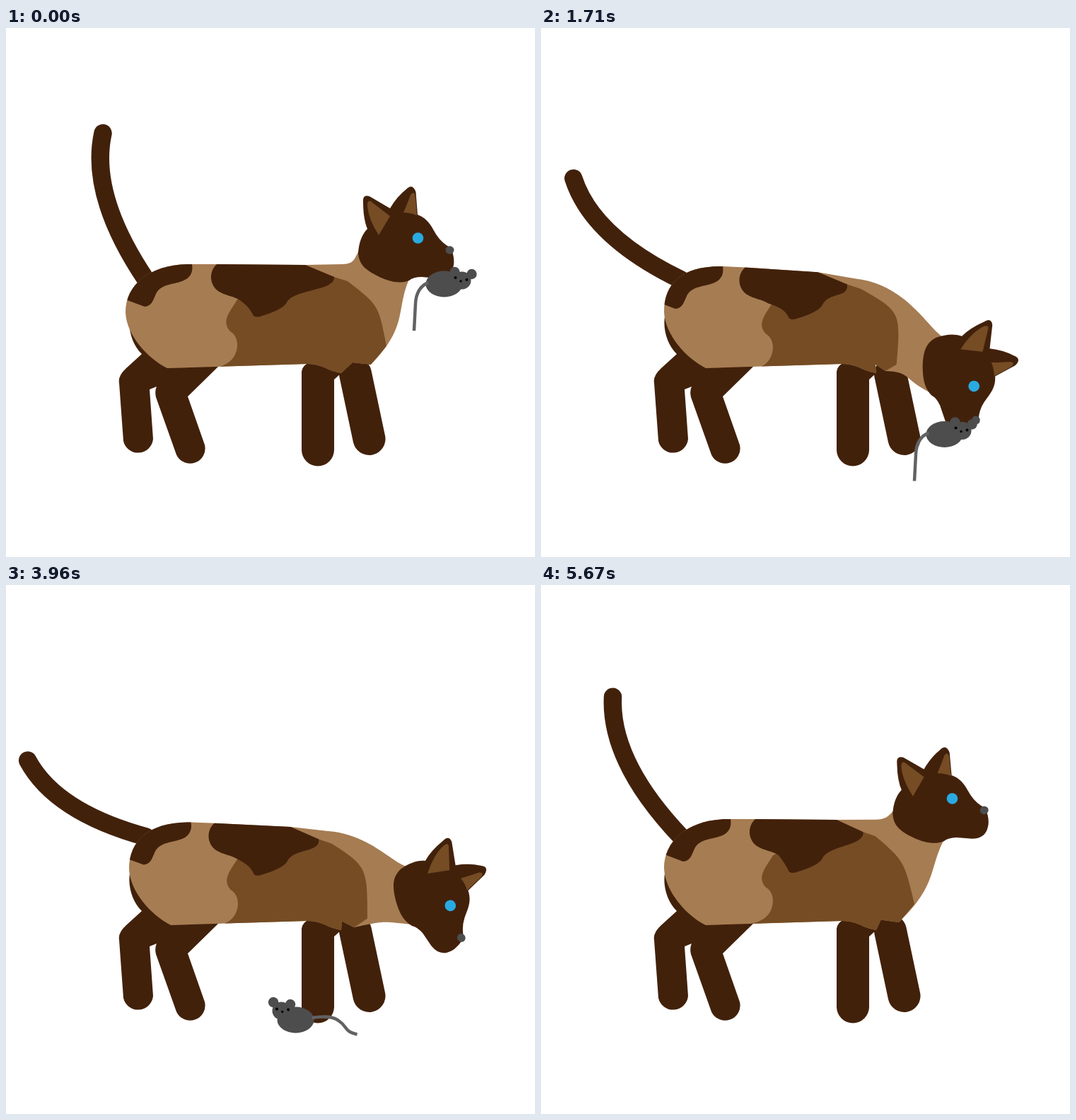
Recreate the animation shown at these times as an HTML page. Size 748x748 px, loop 5.7 s.

```html
<!DOCTYPE html>
<html lang="en">
<head>
<meta charset="utf-8">
<title>Cat and mouse</title>
<style>
html, body { margin: 0; width: 100%; height: 100%; overflow: hidden; background: #fff; }
svg { display: block; width: 100%; height: 100%; }
</style>
</head>
<body>
<svg viewBox="0 0 748 748">
  <defs><clipPath id="bodyClip"><path id="clipShape"/></clipPath></defs>
  <path id="tail" fill="none" stroke="#42210b" stroke-width="25.5" stroke-linecap="round"/>
  <g fill="#42210b">
    <path d="M190,380C166,400 172,442 192,461L170,481Q158,492 160,502L166,584A21.3,21.3 0 0 0 208,581L203,511L213,507Q210,513 212,522L241,603.500A21.3,21.3 0 0 0 281,589.500L257,521L305,474L300,400Z"/>
    <path d="M418,596.500V486Q420,474 434,472H464L474,488L464,497V596.500A23,23 0 0 1 418,596.500"/>
    <path stroke="#42210b" stroke-width="46" stroke-linecap="round" d="M494,489L513.500,581"/>
  </g>
  <path id="body" fill="#a67c52"/>
  <g clip-path="url(#bodyClip)">
    <path id="flank" fill="#754c24"/>
    <path id="saddle" fill="#42210b"/>
    <path id="rump" fill="#42210b"/>
  </g>
  <g id="head">
    <path fill="#42210b" d="M505,246Q504,235 514,238L543,255Q553,238 566,228Q575,219 579.500,232L582,264C598,270 602,282 609,293Q616,304 629,311C635,325 634,335 631,342Q626,354 610,354L588,352Q576,352 570,357C555,363 540,357 530,353C508,343 499,334 498,318C499,304 503,292 511,284Q505,270 505,246Z"/>
    <path fill="#754c24" d="M511,249Q512,242 517,246L543,266L527,293Q511,268 511,249Z"/>
    <path fill="#754c24" d="M572,236Q577,229 579,239L581,265Q572,261 562,261Q568,247 572,236Z"/>
    <circle cx="582.500" cy="297" r="7.800" fill="#29abe2"/>
    <ellipse cx="627.500" cy="314" rx="6" ry="5.800" fill="#4d4d4d"/>
  </g>
  <g id="mouse">
    <ellipse rx="26" ry="18.500" fill="#4d4d4d"/>
    <g id="mouseHead">
      <g fill="#4d4d4d">
        <circle cx="25.500" cy="-5" r="12.500"/>
        <circle cx="15" cy="-17" r="7.200"/>
        <circle cx="39" cy="-14" r="7.200"/>
      </g>
      <circle cx="16" cy="-9" r="2"/>
      <circle cx="32" cy="-6" r="2"/>
      <circle cx="23.500" cy="-4" r="1.700"/>
    </g>
    <path id="mouseTail" fill="none" stroke="#626262" stroke-width="4.500"/>
  </g>
</svg>
<script>
const LOOP = 5700, STEP = 30, RUN = 3600, GONE = 4860;
const EYE = [582, 297];
const set = (id, name, value) => document.getElementById(id).setAttribute(name, value);
const smooth = s => s * s * (3 - 2 * s);
const mix = (a, b, k) => a.map((v, i) => v + (b[i] - v) * k);
const off = (p, dx, dy) => [p[0] + dx, p[1] + dy];
const polar = (r, degrees) => [r * Math.cos(degrees * Math.PI / 180), r * Math.sin(degrees * Math.PI / 180)];

// Smooth monotone interpolation through [time, vector] keys, at rest at both ends.
function track(keys) {
  const rate = (i, k) => (keys[i + 1][1][k] - keys[i][1][k]) / (keys[i + 1][0] - keys[i][0]);
  const slope = (i, k) => {
    if (i === 0 || i === keys.length - 1) return 0;
    const a = rate(i - 1, k), b = rate(i, k);
    return a * b <= 0 ? 0 : 2 * a * b / (a + b);
  };
  return t => {
    if (t >= keys[keys.length - 1][0]) return keys[keys.length - 1][1];
    const i = keys.findIndex((key, n) => t < keys[n + 1][0]);
    const [t0, from] = keys[i], [t1, to] = keys[i + 1];
    const h = t1 - t0, s = (t - t0) / h;
    return from.map((v, k) => v + (to[k] - v) * smooth(s)
      + h * slope(i, k) * s * (1 - s) ** 2 + h * slope(i + 1, k) * s * s * (s - 1));
  };
}

// Head poses: eye x, eye y, tilt in degrees.
const proud = [...EYE, 0], level = [628, 397, 30.7], lowered = [628, 453, 50.5], bowed = [612, 506, 66];
const headAt = track([
  [0, proud], [600, mix(proud, level, 0.5)], [840, level], [1200, lowered], [1710, bowed],
  [3390, bowed], [3960, lowered], [4250, level], [4680, [595, 315, 4]], [4820, [581, 302, -0.7]]
]);

// Tail: angle from upright and length.
const up = [16.4, 216];
const tailAt = track([
  [0, up], [850, up], [1710, [46.7, 209]], [1815, [53, 205]], [3100, [43, 207]], [3390, [44.6, 205]],
  [4200, [60, 198]], [4680, [38.2, 239]], [5050, up], [5350, up], [5670, [26, 220]]
]);

const carriedAt = track([
  [0, [619.5, 362]], [600, [628, 416]], [840, [619.5, 474.5]], [1200, [607, 536]],
  [1710, [570.5, 574.5]], [3000, [559, 605]], [3390, [558, 615]]
]);

function drawCat([x, y, tilt], settle) {
  const bend = tilt / 66;
  // The trunk shortens as it settles, and its back slides rearward as the head bows.
  const lean = (px, py) => [
    px + settle * (5 - 0.082 * Math.max(0, px - 300))
      - bend * bend * (11 + 0.1 * (px - 263)) * Math.max(0, 400 - py) / 66,
    py + (481 - py) / 147 * (bend * (6 + 0.045 * (px - 263)) - 3 * settle)
  ];
  const withHead = (px, py) => {
    const [c, s] = polar(1, tilt), dx = px - EYE[0], dy = py - EYE[1];
    return [x + dx * c - dy * s, y + dx * s + dy * c];
  };
  const pull = (px, py, weight) => mix(lean(px, py), withHead(px, py), weight);

  const rumpTop = lean(263, 334), rear = lean(169, 402), belly = lean(228, 481);
  const saddleL = lean(298, 334), saddleR = lean(423, 335);
  const saddleTip = lean(464, 352), saddleLow = lean(350, 407);
  const nape = pull(475, 334, 0.1), napeEnd = withHead(505, 305);
  const reach = Math.hypot(napeEnd[0] - nape[0], napeEnd[1] - nape[1]) / 2;
  const chest = pull(516, 476, 0.2), bendPoint = lean(527, 392);

  const outline = `M${belly}C${off(belly, -28, -14)} ${off(rear, 1, 32)} ${rear}`
    + `C${off(rear, 0, -40)} ${off(rumpTop, -58, -1)} ${rumpTop}L${saddleL}L${saddleR}L${nape}`
    + `C${off(nape, reach, reach * 0.1 * bend)} ${withHead(492, 323)} ${napeEnd}L${withHead(571, 353)}`
    + `C${pull(550, 400, 0.8)} ${pull(570, 420, 0.5)} ${chest}L${pull(490, 473, 0.1)}`
    + 'L474,488Q462,486 450,480Q438,475 425,475Z';
  set('body', 'd', outline);
  set('clipShape', 'd', outline);
  set('rump', 'd', `M${rumpTop}c2,12 -3,20 -14,24c-14,5 -28,4 -36,16c-5,10 -6,19 -17,20l-32,-12v-70h99z`);
  set('saddle', 'd', `M${saddleL}c-11,10 -11,28 2,38c11,7 22,7 31,13`
    + `C${off(saddleLow, -8, -14)} ${off(saddleLow, -4, -8)} ${saddleLow}q4,3 12,0`
    + `Q${off(saddleLow, 42, -9)} ${off(saddleLow, 47, -19)}`
    + `C${off(saddleLow, 57, -38)} ${off(saddleTip, 2, 20)} ${saddleTip}L${saddleR}V320H${saddleL[0]}Z`);
  set('flank', 'd', `M${off(saddleLow, -23, -23)}c-9,16 -24,30 -10,45c16,9 12,38 -6,46q-6,4 -14,5v20`
    + `H474L${chest}L${pull(538, 450, 0.3)}C${bendPoint} ${bendPoint} ${lean(483, 358)}L${saddleTip}L${saddleR}Z`);
  set('head', 'transform', `translate(${x},${y}) rotate(${tilt}) translate(${-EYE[0]},${-EYE[1]})`);
}

function drawTail([angle, length]) {
  const at = (part, turn) => off(polar(length * part, 270 - angle - turn), 198, 356);
  set('tail', 'd', `M${at(1, 0)}C${at(0.73, 12.5)} ${at(0.36, 17.5)} 198,356`);
}

function drawMouse(t) {
  const running = t >= RUN;
  const [x, y] = running ? [558 - 0.4125 * (t - RUN), 615] : carriedAt(t);
  set('mouse', 'visibility', t < GONE ? 'visible' : 'hidden');
  set('mouse', 'transform', `translate(${x},${y})`);
  set('mouseHead', 'transform', running ? 'translate(3,-2) rotate(14) scale(-1,1)' : '');
  set('mouseTail', 'd', running
    ? 'M23,-3C42,-6 54,-5 62,2C74,10 68,16 87,20.500'
    : 'M-22,-2C-34,2 -40,14 -40.500,28L-42.500,66');
}

const start = performance.now();
function frame() {
  const elapsed = (performance.now() - start) % LOOP;
  const t = Math.floor(elapsed / STEP) * STEP;
  drawCat(headAt(t), smooth(Math.min(1, t / 840)));
  drawTail(tailAt(t));
  drawMouse(t);
  requestAnimationFrame(frame);
}
frame();
</script>
</body>
</html>
```
